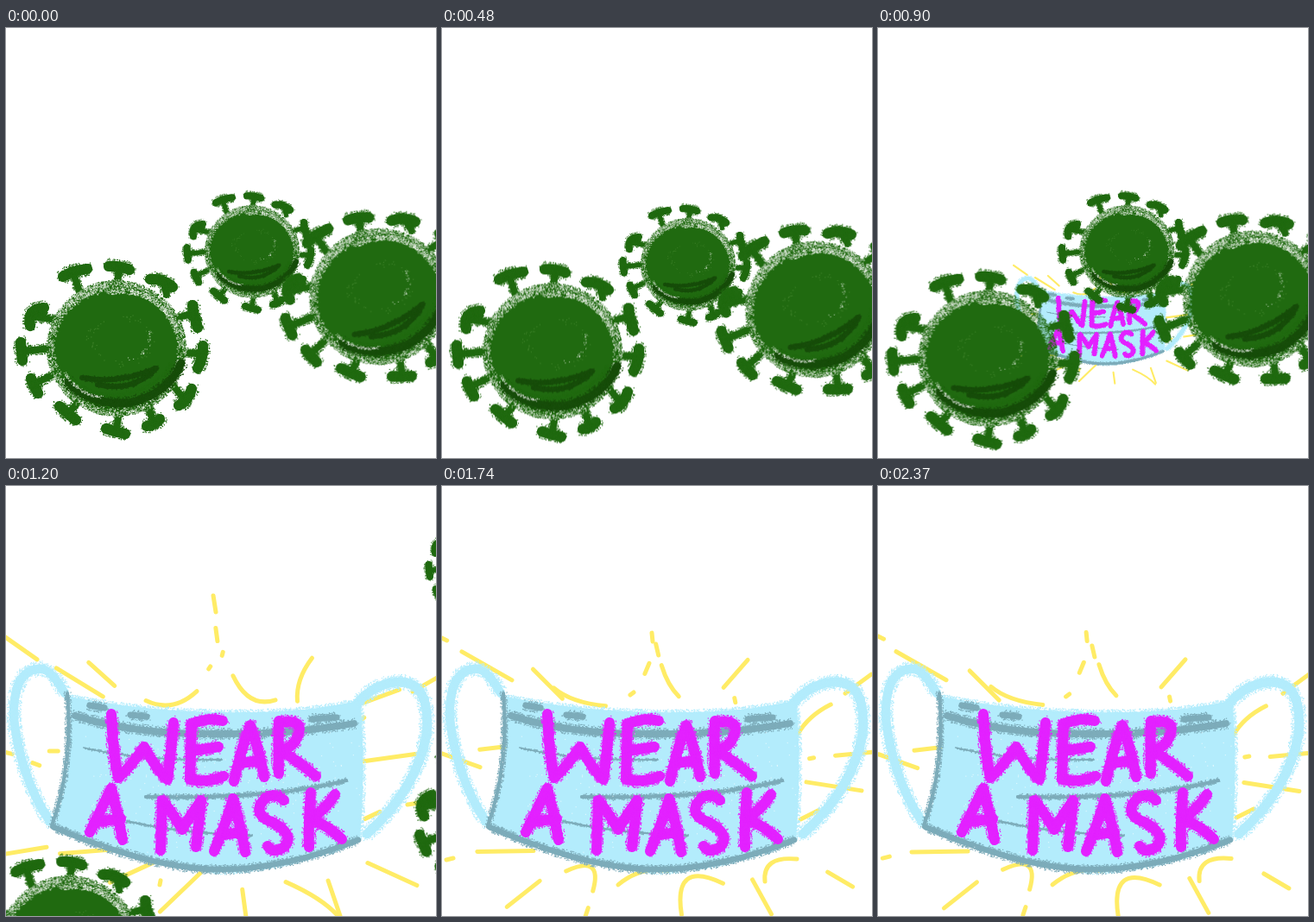
Write an HTML page with a canvas that moves like this. It is 498 px wide and 498 px high and loops after 2400 ms.

```html
<!DOCTYPE html>
<html lang="en">
<head>
<meta charset="utf-8">
<title>Wear a mask</title>
<style>
  html, body { margin: 0; width: 100%; height: 100%; overflow: hidden; background: #fff; }
  canvas { display: block; }
</style>
</head>
<body>
<canvas id="stage" width="498" height="498" role="img" aria-label="Wear a mask"></canvas>
<script>
const SIZE = 498, LOOP = 2400;
const GREEN = '#206a10', SHADE = '#174d0a', BLUE = '#b3ecfc', GREY = '#7dacba', PINK = '#e322ff', YELLOW = '#ffec66';
const ctx = document.getElementById('stage').getContext('2d');

let seed = 7;
const random = () => (seed = (seed * 16807) % 2147483647) / 2147483647;

function layer(paint) {
  const canvas = document.createElement('canvas');
  canvas.width = canvas.height = SIZE;
  const c = canvas.getContext('2d');
  c.lineCap = c.lineJoin = 'round';
  paint(c);
  return canvas;
}

// Scatters small grains along a path
function grain(c, d, width, color, density) {
  const path = document.createElementNS('http://www.w3.org/2000/svg', 'path');
  path.setAttribute('d', d);
  const length = path.getTotalLength();
  c.fillStyle = color;
  for (let n = length * width * density; n > 0; n--) {
    const p = path.getPointAtLength(random() * length);
    const a = random() * 2 * Math.PI, r = Math.sqrt(random()) * width / 2;
    c.fillRect(p.x + Math.cos(a) * r - .6, p.y + Math.sin(a) * r - .6, 1.2, 1.2);
  }
}

// A solid core with a crumbly edge
function chalk(c, d, width, color, core = .75, density = .5) {
  c.strokeStyle = color;
  c.lineWidth = width * core;
  c.stroke(new Path2D(d));
  grain(c, d, width + 1, color, density);
}

function erase(c, d, width, density) {
  c.globalCompositeOperation = 'destination-out';
  grain(c, d, width, '#0008', density);
  c.globalCompositeOperation = 'source-over';
}

const oval = (x, y, rx, ry) => `M${x - rx} ${y}a${rx} ${ry} 0 1 1 ${2 * rx} 0a${rx} ${ry} 0 1 1 ${-2 * rx} 0`;

const HEADS = 'M66 288Q76 281 94 279M119 276Q132 275 143 280M167 291Q182 290 193 300M216 321Q217 332 222 347' +
  'M228 368Q229 380 222 394M215 418Q211 432 200 437M178 453Q172 460 163 461M116 464Q128 468 138 470' +
  'M62 438Q70 445 81 454M29 406Q32 413 37 423M17 364Q18 375 19 385M28 345Q24 325 44 324M32 332L42 330';
const STALKS = 'M86 308L79 287M128 304L131 280M186 309L183 297M196 336L216 331M203 376L224 377M190 410L205 428' +
  'M165 437L170 456M131 444L128 464M87 430L75 443M56 401L35 411M52 371L22 374M64 339L36 335';

const virus = layer(c => {
  chalk(c, STALKS, 12, GREEN, .65);
  chalk(c, HEADS, 17, GREEN, .72, .6);
  const body = oval(128, 371, 76, 74);
  c.fillStyle = GREEN;
  c.fill(new Path2D(body));
  grain(c, body, 10, GREEN, 1);
  erase(c, body, 12, .3);
  erase(c, 'M120 306Q176 298 198 352', 7, .6);
  erase(c, 'M64 330Q86 304 116 302', 13, .3);
  chalk(c, 'M72 410Q100 438 143 434Q188 424 203 388', 15, SHADE, .6);
  chalk(c, 'M88 405Q130 413 174 394Q148 422 106 413', 7, SHADE, .85);
  chalk(c, 'M72 402Q96 430 138 424Q178 416 192 388', 5, GREEN);
  erase(c, 'M68 399Q84 425 112 428', 4, .5);
  grain(c, 'M92 360Q120 322 158 342Q182 370 150 389Q108 396 102 366', 9, '#3d8129', .035);
  erase(c, 'M142 384Q172 376 166 350', 5, .1);
});

const mask = layer(c => {
  const body = 'M74 244Q160 261 250 262Q345 264 410 248Q417 320 410 408Q345 440 250 447Q150 431 55 395Q80 330 74 244Z';
  chalk(c, 'M68 240Q50 208 36 212Q8 216 9 268Q16 336 51 389', 17, BLUE, .6);
  chalk(c, 'M406 253Q428 226 460 227Q492 231 487 288Q475 352 418 403', 18, BLUE, .6);
  c.fillStyle = BLUE;
  c.fill(new Path2D(body));
  grain(c, body, 7, BLUE, .5);
  chalk(c, 'M80 266Q150 288 240 287Q330 288 403 275', 13, GREY, .6);
  chalk(c, 'M97 254L114 257M144 265L163 267M354 270L383 268', 12, GREY, .6);
  chalk(c, 'M71 240Q78 322 53 394', 8, GREY, .5);
  chalk(c, 'M55 395Q140 431 200 440Q290 456 408 410', 11, GREY, .6);
  chalk(c, 'M162 360Q310 363 394 341', 7, GREY, .6);
  chalk(c, 'M90 303Q150 318 250 317M140 388Q200 402 285 405', 3, GREY, .6);
  erase(c, 'M90 350L400 350', 150, .004);
  const letters = [
    'M122 264Q124 310 130 338Q147 322 160 302Q172 325 187 340Q192 300 194 274',
    'M215 275L213 340M214 276Q235 267 251 272M215 307L246 302M214 340Q235 344 252 336',
    'M264 342Q272 305 283 277Q293 305 299 337M271 321L295 318',
    'M316 272Q315 305 316 333M317 274Q346 269 338 289Q333 303 318 306Q340 320 359 336',
    'M97 401Q110 375 122 350Q130 380 135 410M106 389L133 385',
    'M179 422Q180 390 181 364Q194 380 204 398Q214 380 226 364Q223 395 220 418',
    'M241 423Q255 390 263 362Q272 395 277 424M249 404L274 401',
    'M322 364Q305 350 294 370Q290 383 310 390Q335 405 322 418Q310 427 303 417',
    'M353 355Q350 390 351 418M381 357Q370 375 353 385Q375 395 389 409'
  ];
  letters.forEach(d => chalk(c, d, 16, PINK));
});

// Two hand-drawn poses of the rays around the mask
const strokes = d => d.split(/(?=M)/).map(s => new Path2D(s));
const RAYS = [
  strokes('M0 175L37 201M58 210L112 243M95 205L125 232M163 249Q194 264 222 238M240 126L243 145M242 165L244 180' +
    'M252 193L251 197M237 208L235 211M262 220Q280 258 311 248M338 250Q336 225 355 200M415 250L456 235M470 238L498 222' +
    'M412 271L415 269M415 318L480 309M415 385L432 377M465 370L498 365M0 308L8 310M30 320L38 323M50 308L60 308' +
    'M0 426L48 418M62 425L125 420M120 460L170 437M180 457L179 462M225 447L178 492M273 468L277 498' +
    'M325 459Q368 478 386 499M373 456L387 497M418 437L475 463'),
  strokes('M0 175L6 178M22 192L80 225M106 213L140 247M130 233Q150 250 190 254M242 170L243 180M248 184L251 197' +
    'M255 207Q262 230 275 243M239 205L234 217M218 243L222 240M355 201L327 233M338 245L339 250M450 254Q424 267 412 288' +
    'M468 240L498 218M425 315L430 314M455 313L498 309M423 343L487 353M415 385L435 375M43 306L77 302M0 310L45 326' +
    'M5 432L13 430M40 424L105 423M76 488L114 458M144 445Q187 425 175 468M203 462Q230 440 260 446' +
    'M278 497Q268 433 326 461M360 455L382 495M373 458Q370 428 410 432M447 448L476 465M170 488L167 497')
];

const VIRUSES = [
  { x: 285, y: 259, scale: .68, turn: 0, bob: 15, period: 1020, dx: 281, dy: -164 },
  { x: 128, y: 371, scale: 1, turn: 0, bob: 10, period: 600, dx: -55, dy: 153 },
  { x: 432, y: 311, scale: 1, turn: -.29, bob: 15, period: 1020, dx: 156, dy: 68 }
];

function drawMask(t) {
  const x = Math.min(1, Math.max(0, (t - 730) / 380));
  const scale = x * x * (3 - 2 * x);
  if (!scale) return;
  ctx.save();
  ctx.translate(273, 348);
  ctx.scale(scale, scale);
  ctx.translate(-273, -348);
  ctx.strokeStyle = YELLOW;
  ctx.lineWidth = 5;
  ctx.lineCap = 'round';
  RAYS[Math.floor((t + 15) / 150) % 2].forEach((ray, i) => {
    const a = t / 70 + i * 2;
    ctx.save();
    ctx.translate(Math.sin(a), Math.cos(a));
    ctx.stroke(ray);
    ctx.restore();
  });
  ctx.drawImage(mask, 0, 0);
  ctx.restore();
}

function drawVirus(v, t) {
  const s = Math.max(0, t - 899);
  const push = 2.28 * s / (s + 389);
  const bob = v.bob * (1 - Math.cos(2 * Math.PI * Math.min(t, 1020) / v.period)) / 2;
  ctx.save();
  ctx.translate(v.x + v.dx * push, v.y + v.dy * push + bob);
  ctx.rotate(v.turn);
  ctx.scale(v.scale, v.scale);
  ctx.drawImage(virus, -128, -371);
  ctx.restore();
}

function frame() {
  const t = performance.now() % LOOP;
  ctx.fillStyle = '#fff';
  ctx.fillRect(0, 0, SIZE, SIZE);
  drawMask(t);
  VIRUSES.forEach(v => drawVirus(v, t));
  requestAnimationFrame(frame);
}
frame();
</script>
</body>
</html>
```
